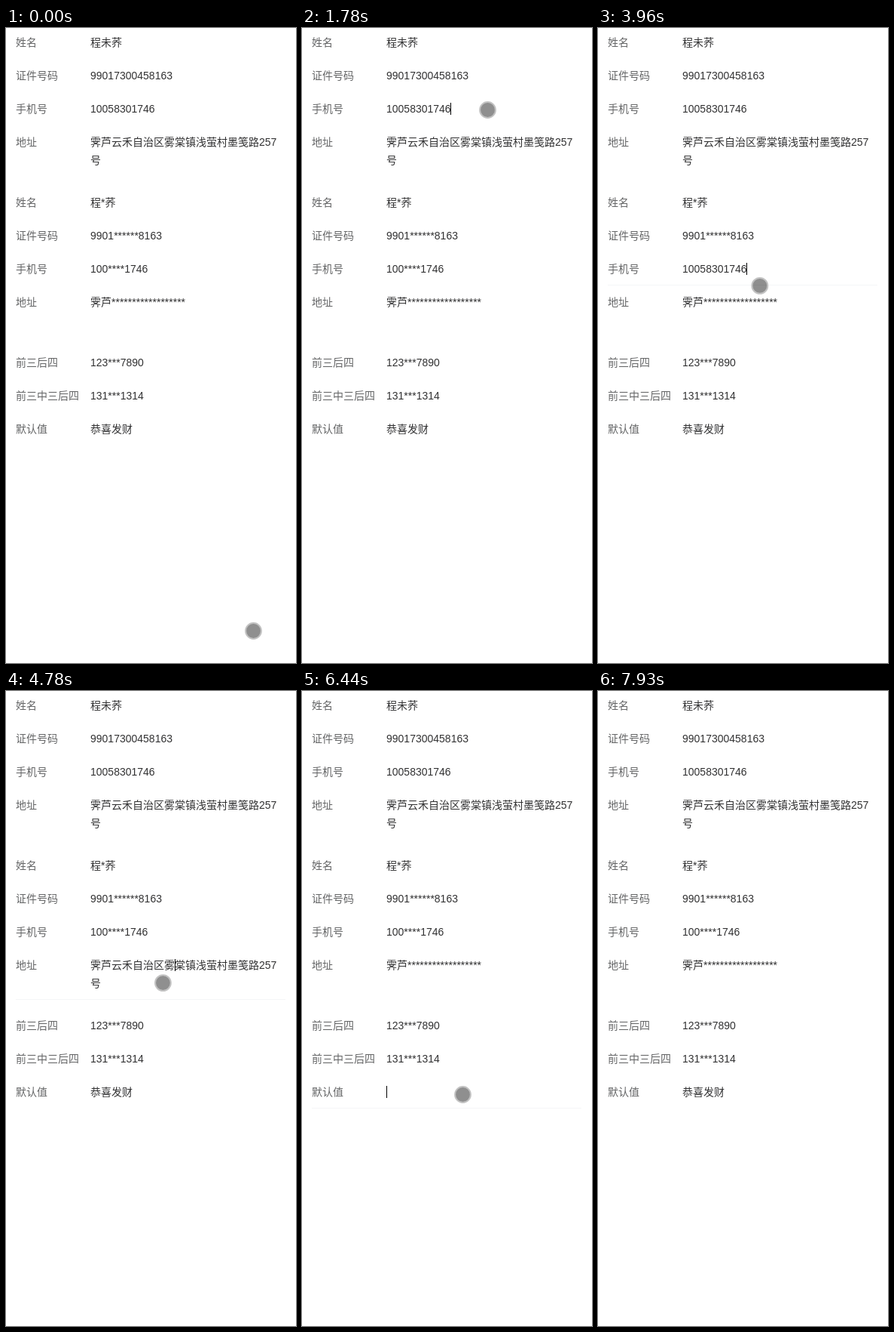
An HTML page for the animation above (8 s loop, 385 by 841 pixels).

```html
<!DOCTYPE html>
<html lang="zh-CN">
<head>
<meta charset="utf-8">
<style>
  html, body { margin: 0; width: 100%; height: 100%; overflow: hidden; background: #fff; }
  svg { display: block; }
  text { font: 14px "Liberation Sans", "Noto Sans CJK SC", "Noto Sans CJK", sans-serif; fill: #323233; white-space: pre; }
  .label { fill: #646566; }
</style>
</head>
<body>
<svg id="stage" width="385" height="841" viewBox="0 0 385 841"></svg>
<script>
const LOOP = 8000, BLINK = 500;
const TAP_DELAY = 140, HOLD = 180, BLUR = 7920, POINTER_END = 7690;
const LEFT = 112, ROW = 44, LINE = 24;
const stage = document.getElementById('stage');

function add(tag, attrs) {
  const el = document.createElementNS('http://www.w3.org/2000/svg', tag);
  for (const key in attrs) el.setAttribute(key, attrs[key]);
  return stage.appendChild(el);
}

const show = (el, on) => el.setAttribute('visibility', on ? 'visible' : 'hidden');
const mask = (text, head, tail, stars) =>
  text.slice(0, head) + '*'.repeat(stars) + text.slice(text.length - tail);

const person = [
  { label: '姓名', value: '程未荞', hide: [1, 1, 1] },
  { label: '证件号码', value: '99017300458163', hide: [4, 4, 6] },
  { label: '手机号', value: '10058301746', hide: [3, 4, 4] },
  { label: '地址', value: '霁芦云禾自治区雾棠镇浅萤村墨笺路257\n号', hide: [2, 0, 18], caretAt: 8 }
];
const samples = [
  { label: '前三后四', value: '1234567890', hide: [3, 4, 3] },
  { label: '前三中三后四', value: '1315201314', hide: [3, 4, 3] },
  { label: '默认值', value: '', fallback: '恭喜发财' }
];

function makeRow(field, y, masked) {
  const { label, value, hide, fallback, caretAt = value.length } = field;
  add('text', { x: 13, y: y + 5, class: 'label' }).textContent = label;
  const lines = [0, LINE].map(dy => add('text', { x: LEFT, y: y + 5 + dy }));
  lines[0].textContent = value.split('\n')[0];
  const caretX = LEFT + (caretAt && Math.floor(lines[0].getSubStringLength(0, caretAt) + 0.05));
  const rest = fallback || (masked ? mask(value, ...hide) : value);
  return { y, lines, rest, value, caretX, masked };
}

const rows = [person, person, samples].flatMap((fields, group) =>
  fields.map((field, i) => makeRow(field, 19 + 212 * group + ROW * i, group > 0)));

// arrival time, x, y of the pointer: start, one tap per field, exit
const stops = [
  [-120, 328.5, 798.5],
  [790, 190, 28], [1090, 246, 80], [1630, 246.5, 108.5], [2170, 226, 156],
  [2710, 206.5, 238], [3190, 240.5, 282.5], [3650, 224, 321.5], [4540, 204, 365],
  [5380, 221.5, 450.5], [5840, 222, 489], [6270, 213.5, 534.5], [7100, 222, 444],
  [POINTER_END, 345.5, 826.5]
];
const taps = stops.slice(1, -1).map(([time, , y]) => ({
  time: time + TAP_DELAY,
  row: rows.find(row => Math.abs(row.y - y) < ROW / 2)
}));

const underline = add('rect', { x: 13, width: 358, height: 1, fill: '#f5f6f7' });
const caret = add('rect', { width: 1, height: 16, fill: '#000' });
const pointer = add('circle', {
  r: 10.4, fill: '#000', 'fill-opacity': 0.44, stroke: '#c2c2c2', 'stroke-width': 2
});

function pointerAt(time) {
  const next = stops.findIndex(stop => stop[0] > time);
  const [arrived, x0, y0] = stops[next - 1], [due, x1, y1] = stops[next];
  const leave = arrived + HOLD;
  const u = Math.max(0, (time - leave) / (due - leave));
  const ease = 1 - (1 - u) ** 3;
  return [x0 + (x1 - x0) * ease, y0 + (y1 - y0) * ease];
}

function draw(time) {
  const tap = time < BLUR && taps.filter(t => t.time <= time).pop();
  const active = tap && tap.row;

  for (const row of rows) {
    const text = (row === active ? row.value : row.rest).split('\n');
    row.lines.forEach((line, n) => line.textContent = text[n] || '');
  }

  show(caret, active && (time - tap.time) % (2 * BLINK) < BLINK);
  show(underline, active && active.masked);
  if (active) {
    const extraLines = active.value.split('\n').length - 1;
    caret.setAttribute('x', active.caretX);
    caret.setAttribute('y', active.y - 8);
    underline.setAttribute('y', active.y + 21 + LINE * extraLines);
  }

  show(pointer, time < POINTER_END);
  if (time < POINTER_END) {
    const [x, y] = pointerAt(time);
    pointer.setAttribute('cx', x);
    pointer.setAttribute('cy', y);
  }
}

const start = performance.now();
function tick() {
  draw((performance.now() - start) % LOOP);
  requestAnimationFrame(tick);
}
tick();
</script>
</body>
</html>
```
